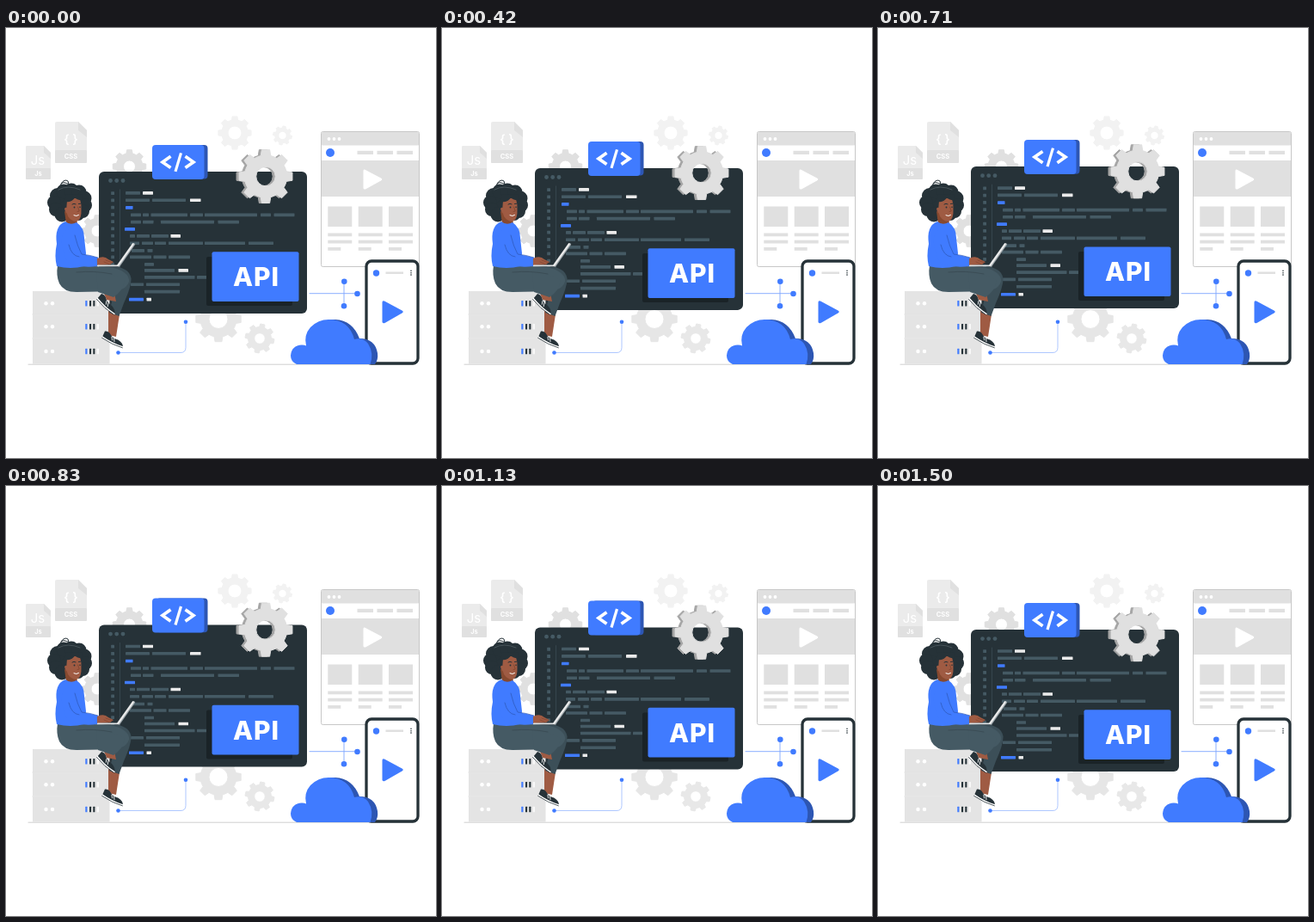
These frames come from a looping animation (500x500 px, 1.54 s). An HTML page:

```html
<!DOCTYPE html>
<html lang="en">
<head>
<meta charset="utf-8">
<title>API workspace</title>
<style>
  html, body { margin: 0; width: 100%; height: 100%; overflow: hidden; background: #fff; }
  svg { display: block; width: 100%; height: 100%; }
  text { text-anchor: middle; fill: #fff; font-family: Inter, Roboto, sans-serif; }
</style>
</head>
<body>
<svg id="stage" viewBox="0 0 500 500"></svg>
<script>
const LOOP = 1540, PEAK = 705, LIFT = 5.9;
const BLUE = '#407bff', NAVY = '#2d56b3', DARK = '#263238', SLATE = '#455a64';
const PALE = '#ebebeb', GREY = '#e0e0e0', SKIN = '#9f5b43';

const rect = (x, y, w, h, fill, r = 0, more = '') =>
  `<rect x="${x}" y="${y}" width="${w}" height="${h}" rx="${r}" fill="${fill}" ${more}/>`;
const dot = (x, y, r, fill) => `<circle cx="${x}" cy="${y}" r="${r}" fill="${fill}"/>`;
const path = (d, fill, more = '') => `<path d="${d}" fill="${fill}" ${more}/>`;
const line = (d, color, w = 1, more = '') =>
  path(d, 'none', `stroke="${color}" stroke-width="${w}" stroke-linecap="round" stroke-linejoin="round" ${more}`);
const label = (x, y, size, weight, s, more = '') =>
  `<text x="${x}" y="${y}" font-size="${size}" font-weight="${weight}" ${more}>${s}</text>`;

function gear(cx, cy, r, hole, fill, turn = 0) {
  const root = r * 0.79, n = 8, step = 2 * Math.PI / n;
  const pts = [];
  for (let i = 0; i < n; i++) {
    const a = i * step - Math.PI / 2 + turn;
    [[-0.3, root], [-0.19, r], [0.19, r], [0.3, root], [0.5, root]].forEach(([k, d]) =>
      pts.push((cx + d * Math.cos(a + k * step)).toFixed(2) + ' ' + (cy + d * Math.sin(a + k * step)).toFixed(2)));
  }
  const ring = `M${cx - hole} ${cy}a${hole} ${hole} 0 1 0 ${2 * hole} 0a${hole} ${hole} 0 1 0 ${-2 * hole} 0Z`;
  return path(`M${pts.join('L')}Z${ring}`, fill,
    `fill-rule="evenodd" stroke="${fill}" stroke-width="1" stroke-linejoin="round"`);
}

function files() {
  return path('M24 137H44L52 145V174Q52 176 50 176H25Q23 176 23 174V139Q23 137 24 137Z', PALE)
    + path('M44 137L52 145V152L44 145Z', GREY)
    + rect(23, 163, 29, 13, GREY, 1)
    + label(37, 159, 15, 400, 'Js') + label(37.5, 172, 7.5, 700, 'Js')
    + path('M59 109H84L94 119V155Q94 157 92 157H59Q57 157 57 155V111Q57 109 59 109Z', PALE)
    + path('M84 109L94 119V127L84 119Z', GREY)
    + rect(57, 142, 37, 15, GREY, 1)
    + label(75.5, 134, 14, 600, '{ }') + label(75.5, 151.5, 7.5, 700, 'CSS');
}

function browser() {
  let s = rect(366.5, 120.5, 114, 157, '#fff', 2, 'stroke="#c7c7c7" stroke-width="1"')
    + rect(367, 121, 113, 15.5, GREY, 1) + rect(367, 154, 113, 42, GREY)
    + dot(377, 145, 5, BLUE)
    + path('M417 164.5L436 174.5Q438.5 176 436 177.5L418 187.5Q415.500 188 415.500 186V166Q415.500 164 417 164.500Z', '#fff');
  [375.5, 381.5, 387.5].forEach(x => s += dot(x, 129, 1.9, '#fff'));
  [408.5, 431.5, 454.5].forEach(x => s += rect(x, 142.8, 18.5, 4.2, GREY));
  [374.3, 409.7, 445].forEach(x => {
    s += rect(x, 207.5, 28, 23.5, GREY) + rect(x, 238.5, 28, 3.8, GREY)
      + rect(x, 246.7, 28, 3.8, GREY) + rect(x, 255, 15, 3.8, GREY);
  });
  return s;
}

// Each row: y, then x, width and an optional colour letter per bar.
const ROWS = `192: 139 17,159 12 w
200.3: 139 28,170 39,214 12.500 w
209: 139 8.500 b
217.5: 145 12,159 7,168.500 42.500,214 15,231 61,296 12,311.500 24
225.7: 145 12,159 12.500,180 62,246.500 24.500
234: 138 12 b
242: 144 6,152 15,169 20,191.500 11.500 w
250.3: 144 11,158 13,173 13,189 40,231 47,282 29
259: 146 15,164.500 6
266.5: 144 25,171.500 15,189 25
275: 161 11
282: 161 35,200.500 11.500 w
290: 161 58.500,222 19
298.3: 145 15,163 39
306.7: 161 41
315.700: 143 17 b,163.500 5.500 w`;
const INK = { w: '#ebebeb', b: BLUE };

function panel() {
  let s = rect(108, 167, 242, 165, DARK, 6);
  [121.5, 128.7, 136].forEach(x => s += dot(x, 177.6, 2.4, SLATE));
  s += line('M132.5 188V325', '#3b4b53', 0.8);
  for (let i = 0; i < 16; i++) s += rect(122.2, 190.3 + i * 8.25, 3.8, 3.8, SLATE, 0.5);
  ROWS.split('\n').forEach(row => {
    const [y, bars] = row.split(': ');
    bars.split(',').forEach(b => {
      const [x, w, ink] = b.split(' ');
      s += rect(x, y - 1.8, w, 3.6, INK[ink] || SLATE, 0.4);
    });
  });
  // raised card
  s += rect(233, 266, 100, 57, '#1a2327', 2)
    + rect(239.5, 260.3, 101, 57.7, BLUE, 2)
    + label(291, 300.300, 30, 800, 'API', 'letter-spacing="1"');
  // tag badge
  s += rect(175, 136, 59.500, 39.700, NAVY, 4) + rect(170, 136, 60.500, 40, BLUE, 4)
    + line('M191.500 149.300L182 156L191.500 162.700M208.500 149.300L218 156L208.500 162.700', '#fff', 3.7,
      'style="stroke-linecap:butt;stroke-linejoin:miter"')
    + line('M203.500 145.500L197 167', '#fff', 3.2, 'style="stroke-linecap:butt"');
  // large cog
  s += gear(299, 172.7, 31.3, 11.2, '#a6a6a6') + gear(302, 172.7, 31.3, 11.2, GREY);
  return s;
}

function servers() {
  let s = '';
  [306, 333.7, 361.700].forEach((y, i) => {
    const m = [320.300, 347.300, 376][i];
    s += rect(31, y, 89.5, i < 2 ? 26.5 : 29, '#e4e4e4')
      + dot(46.500, m, 2.2, '#fff') + dot(54, m, 2.2, '#fff');
    [[92.300, BLUE], [97, DARK], [101.300, DARK], [105.800, '#fafafa']].forEach(([x, c]) =>
      s += rect(x, m - 3.2, 2.1, 6.4, c, 0.500));
  });
  return s + line('M31 333H120M31 361H120', '#c9c9c9', 0.8);
}

function shoe(x, y, tilt) {
  return `<g transform="translate(${x} ${y}) rotate(${tilt})">`
    + path('M0 0Q4 -2 8 1Q12 4 18 3Q25 4 26.500 8Q14 10 0 7Z', DARK)
    + line('M0 7.300Q14 10 26.500 8.400', '#fff', 1.5)
    + line('M0 8.500Q14 11.200 26.500 9.400', DARK, 0.7)
    + line('M10 3L12 6M13 3.600L15 6.600', '#fff', 0.8) + '</g>';
}

function woman() {
  let s = '';
  // hair
  [[73, 202, 19], [60, 195, 9], [56, 203, 8], [58, 211, 8], [65, 217, 8.5], [67, 190, 8.5],
   [76, 189, 8.5], [85, 191, 8.5], [91, 198, 8.5], [92, 206, 8], [89, 213, 8], [84, 217, 7]]
    .forEach(c => s += dot(...c, DARK));
  s += line('M62 186Q64 178 69 180Q74 183 72 178Q68 175 64 181M70 184Q74 179 77 183', DARK, 1)
    + line('M61 188Q72 182 86 188', '#5d6a70', 0.6);
  // neck and face
  s += path('M68 213L70 228Q76 234 83 229L82 220Z', '#87492f')
    + path('M71 201Q78 196 86 199Q88 205 87.500 211Q88 222 83 224.500Q77 226 72 219L70 213Z', SKIN)
    + path('M68 210Q70 207 73 211L73 216Q69 216 68 210Z', SKIN)
    + path('M70 202Q77 203 80 197Q84 201 90 200L88 193L70 194Z', DARK)
    + line('M77 205Q79 203.500 81 204.800M84.500 204.500L87 204.200', DARK, 1)
    + dot(79.500, 208.500, 0.9, DARK) + dot(86, 208.300, 0.8, DARK)
    + line('M83.500 208L85.300 213L83 213.500', '#7a3f2a', 0.7)
    + line('M79 217.800Q82 219.500 84.500 217.500', '#fff', 1);
  // far leg
  s += path('M119 329L132 333L128 359L119 357Z', SKIN)
    + path('M108 279Q142 273 145.500 291Q146 300 137 320L131.500 335L120 331L126 305L105 301Z', '#3c4f58')
    + shoe(115, 352.500, 24);
  // near leg
  s += path('M112 304L124 299L128 318L117 316Z', SKIN)
    + path('M60 276L103 277Q128 277 137 284Q144 289 143 295Q139 307 120 305L108 306.500L82 307Q67 307 62 297Q58 288 60 276Z', SLATE)
    + path('M105 284Q126 286 138 293Q136 306 125 313L107 307Z', SLATE)
    + line('M82 284Q103 282 123 286', '#37474f', 0.7)
    + shoe(111, 309, 40);
  // torso
  s += path('M69 225Q75 230 82 226Q91 232 91 244L93 262L91 277Q75 281 59 277Q56 265 59 251Q56 230 69 225Z', BLUE)
    + path('M70 235Q62 242 66 256Q69 272 76 275Q91 279 106 277L107 267Q96 264 87 263Q82 252 80 241Q77 232 70 235Z', BLUE)
    + line('M80 241Q83 254 88 263Q98 264 107 267M73 252Q76 265 85 266', NAVY, 0.7);
  // laptop and hand
  s += path('M106 268Q114 264 119 269L125 272L121 275L106 276Z', SKIN)
    + line('M116 270L124 273M114 272L121 275', '#7a3f2a', 0.6)
    + line('M107 276.300H130', '#dfe3e5', 1.8)
    + line('M131.500 276.500L149 251.500', '#9aa4a9', 2.2)
    + line('M130.300 276L147.700 251.300', '#ebebeb', 2.3);
  return s;
}

function links() {
  return line('M130.500 377.500H203Q209 377.500 209 371.500V342', '#9ab9ff', 0.8)
    + dot(130.500, 377.500, 2.3, BLUE) + dot(209, 341.800, 2.3, BLUE)
    + line('M353 308.700H408M393 295V323', '#7da5ff', 0.9)
    + dot(408.500, 309, 3.3, BLUE) + dot(393.300, 294.700, 3.3, BLUE) + dot(393, 323.300, 3.3, BLUE);
}

function phone() {
  let s = rect(419, 271, 60, 119, '#fff', 6, `stroke="${DARK}" stroke-width="3.300"`)
    + dot(430.500, 285, 3.700, BLUE) + rect(441.500, 283.500, 20.500, 2.500, GREY)
    + path('M440 317.500L460.500 328.500Q463 330 460.500 331.500L440.500 343Q437.500 344 437.500 341.500V319Q437.500 316.500 440 317.500Z', BLUE);
  [282.300, 284.700, 287.100].forEach(y => s += dot(471, y, 0.8, DARK));
  return s;
}

function cloud() {
  return path('M374 339H383Q403 340 411 361Q429 361 432 378Q433 386 429 391H374Z', NAVY)
    + path('M338 391Q331 388 331 381Q332 369 344 368.500Q347 368.500 349 369.500Q346 357 354 348Q363 339 375 339Q399 339 405 362Q415 359 421 367Q428 378 423.500 391Z', BLUE);
}

document.getElementById('stage').innerHTML =
  rect(0, 0, 500, 500, '#fff') + files()
  + gear(143.500, 161, 19.500, 7, GREY) + gear(106, 236, 18.500, 7, GREY)
  + gear(266, 122, 19.300, 8, '#f2f2f2') + gear(321.500, 125, 11, 4.700, '#f2f2f2', 0.2)
  + gear(247, 338.500, 26.500, 11, '#e6e6e6') + gear(295, 361, 17, 6.300, '#e8e8e8', 0.2)
  + browser()
  + `<g id="panel">${panel()}</g>`
  + line('M26 391.200H474', '#c4c4c4', 0.8)
  + servers() + links() + woman() + phone() + cloud();

const floating = document.getElementById('panel');

function draw(now) {
  const y = -LIFT * (1 + Math.cos(2 * Math.PI * (now % LOOP - PEAK) / LOOP)) / 2;
  floating.setAttribute('transform', `translate(0 ${y.toFixed(3)})`);
}

let start;
function tick(now) {
  start ??= now;
  draw(now - start);
  requestAnimationFrame(tick);
}
draw(0);
requestAnimationFrame(tick);
</script>
</body>
</html>
```
